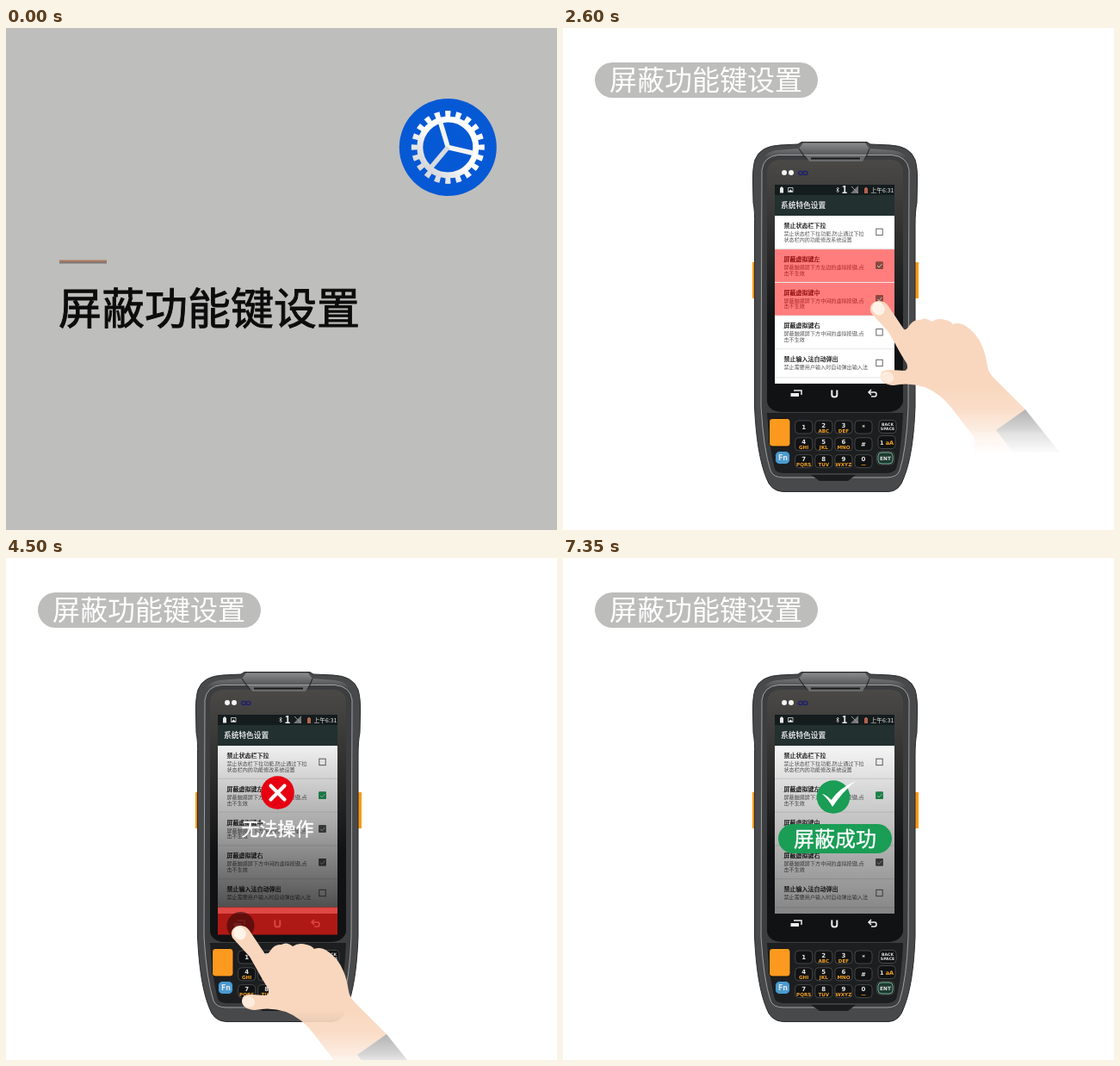
These frames come from a looping animation (640x583 px, 8.55 s). An HTML page:

```html
<!DOCTYPE html>
<html>
<head>
<meta charset="utf-8">
<style>
html, body { margin: 0; width: 100%; height: 100%; overflow: hidden; background: #fff; }
svg { display: block; width: 640px; height: 583px; }
text { font-family: "Noto Sans CJK SC", "Noto Sans CJK", "Noto Sans", sans-serif; }
.key { font-family: "DejaVu Sans", sans-serif; font-weight: bold; text-anchor: middle; fill: #e4e4e4; }
.mid { text-anchor: middle; }
</style>
</head>
<body>
<svg viewBox="0 0 640 583">
<defs>
  <linearGradient id="shade" x2="0" y2="1">
    <stop offset="0" stop-opacity=".06"/><stop offset=".5" stop-opacity=".35"/><stop offset="1" stop-opacity=".69"/>
  </linearGradient>
  <linearGradient id="softShade" x2="0" y2="1">
    <stop offset="0" stop-opacity=".04"/><stop offset="1" stop-opacity=".48"/>
  </linearGradient>
  <linearGradient id="fade" gradientUnits="userSpaceOnUse" x1="0" x2="0" y1="415" y2="493">
    <stop offset="0" stop-color="#fff"/><stop offset=".35" stop-color="#d8d8d8"/>
    <stop offset=".65" stop-color="#777"/><stop offset=".72" stop-color="#505050"/><stop offset="1" stop-color="#080808"/>
  </linearGradient>
  <linearGradient id="glass" x2="0" y2="1">
    <stop offset="0" stop-color="#4a4946"/><stop offset=".12" stop-color="#403f3d"/><stop offset=".65" stop-color="#111213"/>
  </linearGradient>
  <linearGradient id="metal" x2="0" y2="1">
    <stop offset="0" stop-color="#8a8b8d"/><stop offset="1" stop-color="#4b4c4e"/>
  </linearGradient>
  <linearGradient id="steel" x1="1" x2="0" y2="1">
    <stop offset=".5" stop-color="#fff"/><stop offset="1" stop-color="#c9cbd0"/>
  </linearGradient>
  <mask id="handMask" maskUnits="userSpaceOnUse" x="340" y="300" width="250" height="200">
    <path d="M340 300H590V500H340Z" fill="url(#fade)"/>
  </mask>
</defs>

<g id="intro">
  <path d="M0 0H640V583H0Z" fill="#bebebd"/>
  <path d="M62 269.5H117V272H62Z" fill="#b07a5c"/>
  <path d="M62 271.5H117V273.5H62Z" fill="#7c7774"/>
  <text x="61" y="344" font-size="50" fill="#0c0c0c" stroke="#0c0c0c" stroke-width=".9">屏蔽功能键设置</text>
  <circle cx="513.3" cy="138.5" r="56.5" fill="#0659d5"/>
  <g fill="none" stroke="url(#steel)" transform="translate(513.3 138.5)">
    <circle r="32.5" stroke-width="7"/>
    <circle r="39" stroke-width="7" pathLength="40" stroke-dasharray="1" stroke-dashoffset=".5"/>
    <g stroke-width="5.5" stroke="#f4f4f6"><path d="M0 0L-9 -30M0 0L30 7"/><path d="M0 0L-21 25" stroke="#d8dade"/></g>
  </g>
</g>

<g id="demo">
  <rect x="37" y="40" width="259" height="41" rx="20.5" fill="#bdbdbc"/>
  <text x="54" y="72" font-size="32" fill="#fff">屏蔽功能键设置</text>

  <path d="M220 272H226V314H220ZM407 272H413V314H407Z" fill="#f99a14"/>
  <path d="M252 136Q229 137 223 153Q220 163 220.500 180L221 203Q223 212 222.500 230V440Q225 495 236 522Q241 538 256 538.500H378Q391 538 396 522Q407 495 409 440V230Q409 212 411 203L411.500 180Q412 163 409 153Q403 137 380 136L357 135L353 132.500H277L273 135Z" fill="#48494b" stroke="#2a2b2d"/>
  <path d="M274 140L279 133.500H351L356 140L382 142Q393 143 399 150H233Q239 143 248 142Z" fill="url(#metal)"/>
  <path d="M250 147.500Q233 149 231 165L230 440Q233 490 241 514Q244 522 256 522H376Q388 522 391 514Q399 490 401 440L402 165Q400 149 382 147.500Z" fill="#3c3d3f" stroke="#a0a1a3"/>
  <path d="M237 447Q240 490 246 512Q248 517 258 517H374Q384 517 387 512Q393 490 395 447Z" fill="#1d1e20"/>
  <path d="M252 153H381Q395 154 395 168V434Q392 446 376 446H256Q239 446 237 434V168Q238 154 252 153Z" fill="url(#glass)"/>
  <path d="M274 140L281 150L286 154H347L352 150L356 140" fill="none" stroke="#2a2b2d" stroke-width="1.2"/>
  <path d="M281 148H352L348 155H286Z" fill="#6a6b6d"/>
  <path d="M288 151.5H345" stroke="#1a1a1b" stroke-width="2"/>
  <path d="M288 519H340L331 526H298Z" fill="#1c1c1e"/>
  <circle cx="257" cy="168" r="3" fill="#f4f4f4"/><circle cx="265" cy="168" r="3" fill="#f4f4f4"/>
  <g fill="none" stroke="#20206e" stroke-width="1.4"><ellipse cx="276" cy="168.5" rx="2.6" ry="2"/><ellipse cx="281.5" cy="168.5" rx="2.6" ry="2"/></g>

  <path d="M246 182H385V413H246Z" fill="#fff"/>
  <path d="M246 182H385V194H246Z" fill="#141c1d"/>
  <path d="M246 194H385V218H246Z" fill="#22302f"/>
  <g fill="#e8e8e8">
    <path d="M252 185.5H253V184.5H255V185.5H256V191.5H252Z"/>
    <path d="M261.5 185.5H267V190.5H261.5Z" fill="none" stroke="#ddd" stroke-width=".8"/><path d="M262 190L264 187.5L267 190Z"/>
    <path d="M317.5 186.5L320.5 189.5L319 191V185L320.5 186.5L317.5 189.5" fill="none" stroke="#ddd" stroke-width=".7"/>
    <text x="323.5" y="192" font-size="12" font-weight="bold">1</text>
    <path d="M334 192L343 183V192Z" fill="#777"/><path d="M335 184L343 192" stroke="#999"/>
    <path d="M350 186H351V185H353V186H354V192H350Z" fill="#b5634f"/>
    <text x="357.5" y="190.5" font-size="6.800">上午6:31</text>
    <text x="253" y="208.5" font-size="8.700" fill="#fff" stroke="#fff" stroke-width=".15">系统特色设置</text>
  </g>
  <g id="rows"></g>
  <g id="marks" fill="#f00" fill-opacity=".51"></g>
  <g id="checks"></g>

  <g fill="none" stroke="#eee" stroke-width="1.5">
    <path d="M268 421H277V426"/><path d="M264.5 424H274V428H264.5Z" fill="#eee" stroke="none"/>
    <path d="M312.3 420.5V426Q312.3 428.5 315.3 428.5Q318.3 428.5 318.3 426V420.5" stroke-width="2"/>
    <path d="M358 420L355 423L358 426M355 423H362Q364 423 364 425.5Q364 428 362 428H358"/>
  </g>

  <rect x="239.5" y="453.5" width="24.5" height="32.5" rx="3.5" fill="#fb9a1f" stroke="#111"/>
  <rect x="246.5" y="491.5" width="17" height="15" rx="5" fill="#4a9bd0" stroke="#16222c"/>
  <text class="key" x="255.5" y="502.2" font-size="8">Fn</text>
  <g id="keys"></g>

  <g id="blocked">
    <path d="M246 218H385V406H246Z" fill="url(#shade)"/>
    <path d="M246 405.5H385V437.5H246Z" fill="#d71b16" fill-opacity=".8"/>
    <circle cx="315.5" cy="272.5" r="19.3" fill="#e60012"/>
    <path d="M307.5 264.5L323.5 280.5M323.5 264.5L307.5 280.5" stroke="#fff" stroke-width="4.2" stroke-linecap="round"/>
    <text class="mid" x="315.5" y="322" font-size="21" fill="#fff" stroke="#fff" stroke-width=".4">无法操作</text>
    <circle id="press" cy="427" r="16" fill="#300808" fill-opacity=".6"/>
  </g>

  <g id="success">
    <path d="M246 218H385V413H246Z" fill="url(#softShade)"/>
    <circle cx="314" cy="277.5" r="19.3" fill="#1a9d55"/>
    <path d="M301 274Q306 275 311.5 281Q321 267 340 259Q325 271 313 289Q308 280 301 274Z" fill="#fff"/>
    <rect x="250" y="309" width="132" height="34" rx="17" fill="#1a9d55"/>
    <text class="mid" x="316" y="334.5" font-size="24" fill="#fff" stroke="#fff" stroke-width=".4">屏蔽成功</text>
  </g>

  <g id="hand"><g mask="url(#handMask)">
    <path d="M358 331C354 323 361 316 368 317Q374 317 378 323L396 350Q399 351 402 346Q407 338 415 339Q421 335 428 341Q435 336 444 339Q450 340 453 344Q461 341 469 347Q481 355 487 370Q491 379 493 393Q494 400 501 407L537 443L577 493H478V476L452 442Q438 424 420 417Q402 411 384 415Q370 414 369 405Q369 396 380 397L397 398Q402 396 399 389Q394 382 386 367L378 353Z" fill="#f9d7be"/>
    <path d="M503 467L537 443L577 493H523Z" fill="#a4a4a4"/>
    <ellipse cx="366.500" cy="326" rx="7" ry="8" transform="rotate(-35 366 326)" fill="#fff3e9"/>
    <ellipse cx="377" cy="405.500" rx="7.500" ry="6.500" transform="rotate(20 377 405)" fill="#fdebdc"/>
  </g></g>
</g>
</svg>

<script>
const $ = id => document.getElementById(id);
const rowStep = 38.8;
const rows = [
  ["禁止状态栏下拉", "禁止状态栏下拉功能,防止通过下拉", "状态栏内的功能修改系统设置"],
  ["屏蔽虚拟键左", "屏蔽触摸屏下方左边的虚拟按键,点", "击不生效"],
  ["屏蔽虚拟键中", "屏蔽触摸屏下方中间的虚拟按键,点", "击不生效"],
  ["屏蔽虚拟键右", "屏蔽触摸屏下方中间的虚拟按键,点", "击不生效"],
  ["禁止输入法自动弹出", "禁止需要用户输入时自动弹出输入法", ""]
];

$("rows").innerHTML = rows.map(([title, ...lines], i) => {
  const y = 232 + i * rowStep;
  const boxY = y + (i == 4 ? -1.9 : 1.2);
  return `<text x="256.5" y="${y}" font-size="7" fill="#111" stroke="#111" stroke-width=".2">${title}</text>` +
    lines.map((s, n) => `<text x="256.5" y="${y + 8.9 + n * 6.8}" font-size="6.1" fill="#555">${s}</text>`).join("") +
    `<rect x="363.8" y="${boxY}" width="7.4" height="7.4" fill="none" stroke="#666"/>` +
    `<path d="M246 ${i == 4 ? 406 : y + 24.3}H385" stroke="#ddd" stroke-width=".8"/>`;
}).join("");

for (let i = 1; i < 4; i++) {
  const y = 233.2 + i * rowStep;
  $("checks").innerHTML += `<g><rect x="363.3" y="${y - .5}" width="8.4" height="8.4" rx="1"/>` +
    `<path d="M365 ${y + 4}l2 2l3.5 -4" fill="none" stroke="#ddd" stroke-opacity=".8"/></g>`;
  $("marks").innerHTML += `<rect x="246" y="${218.3 + i * rowStep}" width="139" height="37.8"/>`;
}

function key(x, y, main, sub = "") {
  return `<rect x="${x - 10}" y="${y - 7.5}" width="20" height="15" rx="4" fill="#111213" stroke="#515254" stroke-width=".8"/>` +
    `<text class="key" x="${x}" y="${y + (sub ? 0 : 2.2)}" font-size="7">${main}</text>` +
    `<text class="key" x="${x}" y="${y + 6}" font-size="5.6" style="fill:#f0a024">${sub}</text>`;
}
const labels = ["1", "2 ABC", "3 DEF", "*", "4 GHI", "5 JKL", "6 MNO", "#", "7 PQRS", "8 TUV", "9 WXYZ", "0 —"];
$("keys").innerHTML = labels.map((s, i) =>
  key(279.7 + i % 4 * 23.1, 463.5 + (i >> 2) * 19.8, ...s.split(" "))).join("") +
  key(377, 463, "") + key(376, 481, "") + key(374.5, 499.5, "") +
  `<text class="key" x="377" y="462" font-size="4.6">BACK</text>
   <text class="key" x="377" y="467" font-size="4.6">SPACE</text>
   <text class="key" x="376" y="483.5" font-size="6.5">1 <tspan fill="#f5a21d">aA</tspan></text>
   <rect x="366" y="493" width="17" height="13" rx="4" fill="#1c3a30" stroke="#75b295"/>
   <text class="key" x="374.5" y="501.5" font-size="5.8">ENT</text>`;

const starts = [0, 950, 1650, 2600, 3550, 4500, 5450, 6400, 7350];
const period = 8550;
const show = (el, on) => el.style.display = on ? "" : "none";

function draw(now) {
  const t = now % period;
  const step = starts.filter(s => s <= t).length - 1;
  const picking = step >= 2 && step <= 4;
  const pressing = step >= 5 && step <= 7;
  show($("intro"), step == 0);
  show($("demo"), step > 0);
  show($("blocked"), pressing);
  show($("success"), step == 8);
  show($("hand"), picking || pressing);
  [...$("checks").children].forEach((el, i) => {
    show(el, step >= i + 2);
    el.setAttribute("fill", picking ? "#864a3e" : i == 0 ? "#1a9d55" : "#4c5250");
  });
  [...$("marks").children].forEach((el, i) => show(el, picking && step >= i + 2));
  const slide = (step - 5) * 43;
  $("press").setAttribute("cx", 272.5 + slide);
  const [x, y] = picking ? [0, (step - 3) * rowStep] : [slide - 95, 110];
  $("hand").setAttribute("transform", `translate(${x} ${y})`);
}

const begin = performance.now();
function loop() {
  draw(performance.now() - begin);
  requestAnimationFrame(loop);
}
loop();
</script>
</body>
</html>
```
